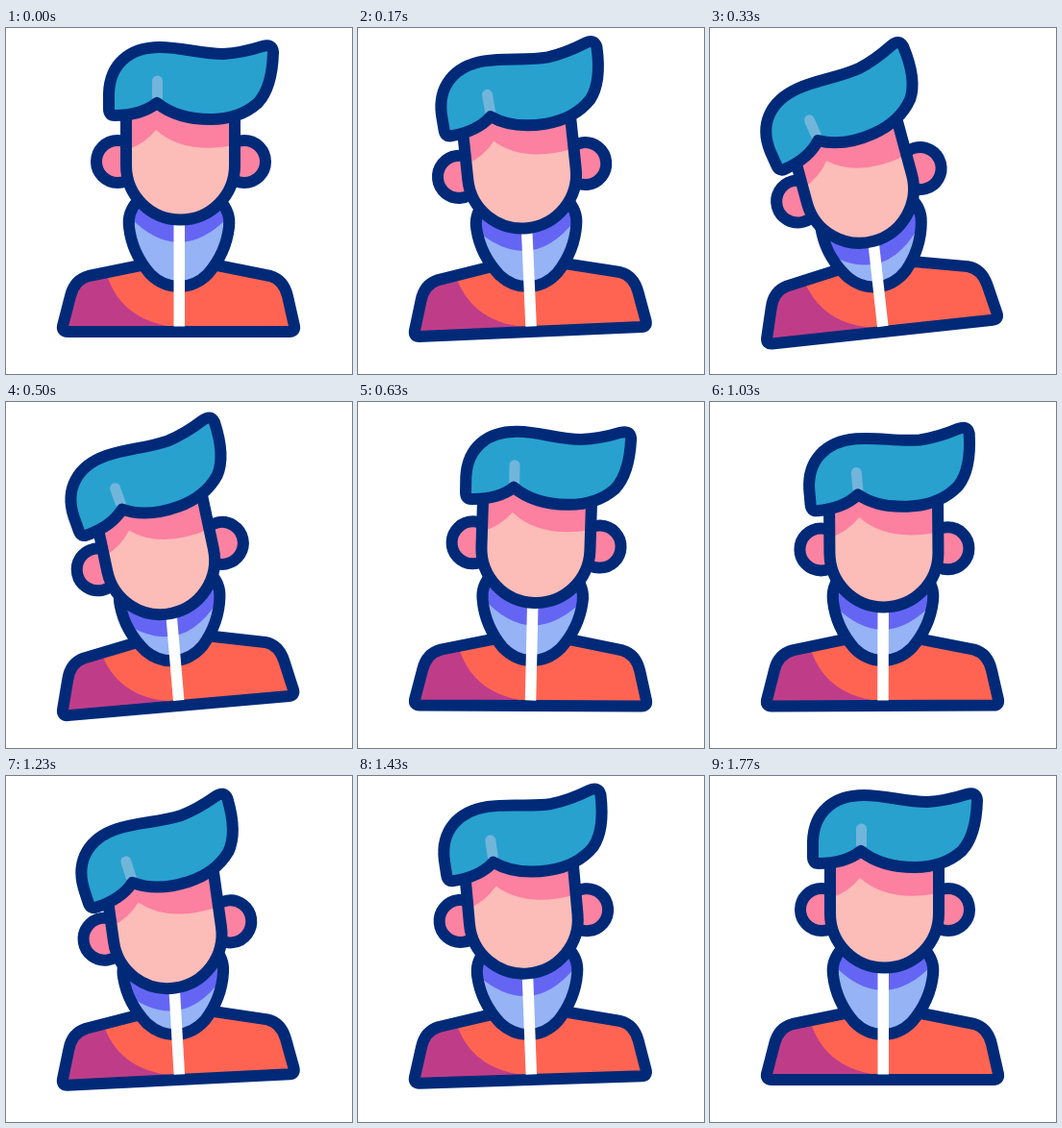
Recreate the animation shown at these times as an HTML page. Size 360 by 360 pixels, loop 2000 ms.

```html
<!DOCTYPE html>
<html lang="en">
<head>
<meta charset="utf-8">
<title>Swaying figure</title>
<style>
  html, body { margin: 0; width: 100%; height: 100%; overflow: hidden; background: #fff; }
  svg { display: block; width: 100vw; height: 100vh; }
  .line { stroke: #002a78; stroke-width: 12; stroke-linejoin: round; stroke-linecap: round; }
</style>
</head>
<body>
<svg viewBox="0 0 360 360">
  <defs>
    <path id="torso" d="M64 316Q58 316 59 310L67 279Q71 262 86 258L140 247H220L275 258Q289 262 293 279L300 310Q301 316 295 316Z"/>
    <path id="collar" d="M137 180Q126 192 128 207Q131 234 150 256Q163 269 180 269Q197 269 210 256Q229 234 232 207Q234 192 223 180Z"/>
    <path id="face" d="M125 76V143A56.5 56.5 0 0 0 238 143V72"/>
    <clipPath id="torsoClip"><use href="#torso"/></clipPath>
    <clipPath id="collarClip"><use href="#collar"/></clipPath>
  </defs>
  <g id="bodyPart">
    <use href="#torso" fill="#ff6452"/>
    <path clip-path="url(#torsoClip)" fill="#bf3d88" d="M40 250H103Q116 303 174 311V330H40Z"/>
    <use href="#torso" class="line" fill="none"/>
    <g id="neckPart">
      <use href="#collar" fill="#95b3f5"/>
      <g clip-path="url(#collarClip)">
        <path id="neckShade" fill="#6565f4" d="M110 140V180L128 196Q180 250 232 196L250 180V140Z"/>
      </g>
      <use href="#collar" class="line" fill="none"/>
      <path fill="#fff" d="M174.5 195H186V310.5H174.5Z"/>
      <g id="headPart">
        <g class="line" fill="#fc82a1">
          <circle cx="116" cy="139" r="22"/>
          <circle cx="248" cy="139" r="22"/>
        </g>
        <use href="#face" fill="#fcbcb8"/>
        <path fill="#fc80a0" d="M125 76V127Q144 121 156 106Q185 132 238 122V72Z"/>
        <use href="#face" class="line" fill="none"/>
        <g id="hairPart">
          <path id="hair" fill="#28a1cf" d="M113 91Q107 91 107 84V68C108 38 128 20 160 20C183 20 203 27 226 27Q245 26 267 19Q277 16 278 25Q277 62 262 78Q243 95 213 95Q178 95 157 78Q141 91 113 91Z"/>
          <path d="M157.5 55V72" stroke="#72b5da" stroke-width="11" stroke-linecap="round"/>
          <use href="#hair" class="line" fill-opacity="0"/>
        </g>
      </g>
    </g>
  </g>
</svg>
<script>
const LOOP = 2000, STEP = 100 / 3, REST = 1767;
const part = id => document.getElementById(id);

// Each track eases through three extremes, 400 ms apart, and then settles.
const track = (left, right, back, end = REST) =>
  [[0, 0], [400, left], [800, right], [1200, back], [end, 0]];

const tracks = {
  body: track(-6.6, 4.26, -2.85),
  neck: track(-0.2, 1.8, -0.5),
  head: track(-9.4, 6.4, -4.7),
  hair: track(-9.7, 4.5, -10, 1590),
  drop: track(23.5, 1, 21.5, 1560),
  hairDrop: track(1.5, 2, 2.5)
};

function valueAt(keys, t) {
  for (let i = 1; i < keys.length; i++) {
    const [t0, a] = keys[i - 1], [t1, b] = keys[i];
    if (t < t1) return a + (b - a) * (1 - Math.cos(Math.PI * (t - t0) / (t1 - t0))) / 2;
  }
  return 0;
}

function pose(id, angle, x, y, dy = 0) {
  part(id).setAttribute("transform", `translate(0 ${dy}) rotate(${angle} ${x} ${y})`);
}

function draw(ms) {
  const t = Math.floor((ms % LOOP + 4) / STEP) * STEP;
  const v = {};
  for (const name in tracks) v[name] = valueAt(tracks[name], t);
  pose("bodyPart", v.body, 180, 316);
  pose("neckPart", v.neck, 180, 270);
  pose("neckShade", v.head, 180, 206, v.drop);
  pose("headPart", v.head, 180, 206, v.drop);
  pose("hairPart", v.hair, 180, 105, v.hairDrop);
}

const start = performance.now();
function frame() {
  draw(performance.now() - start);
  requestAnimationFrame(frame);
}
frame();
</script>
</body>
</html>
```
